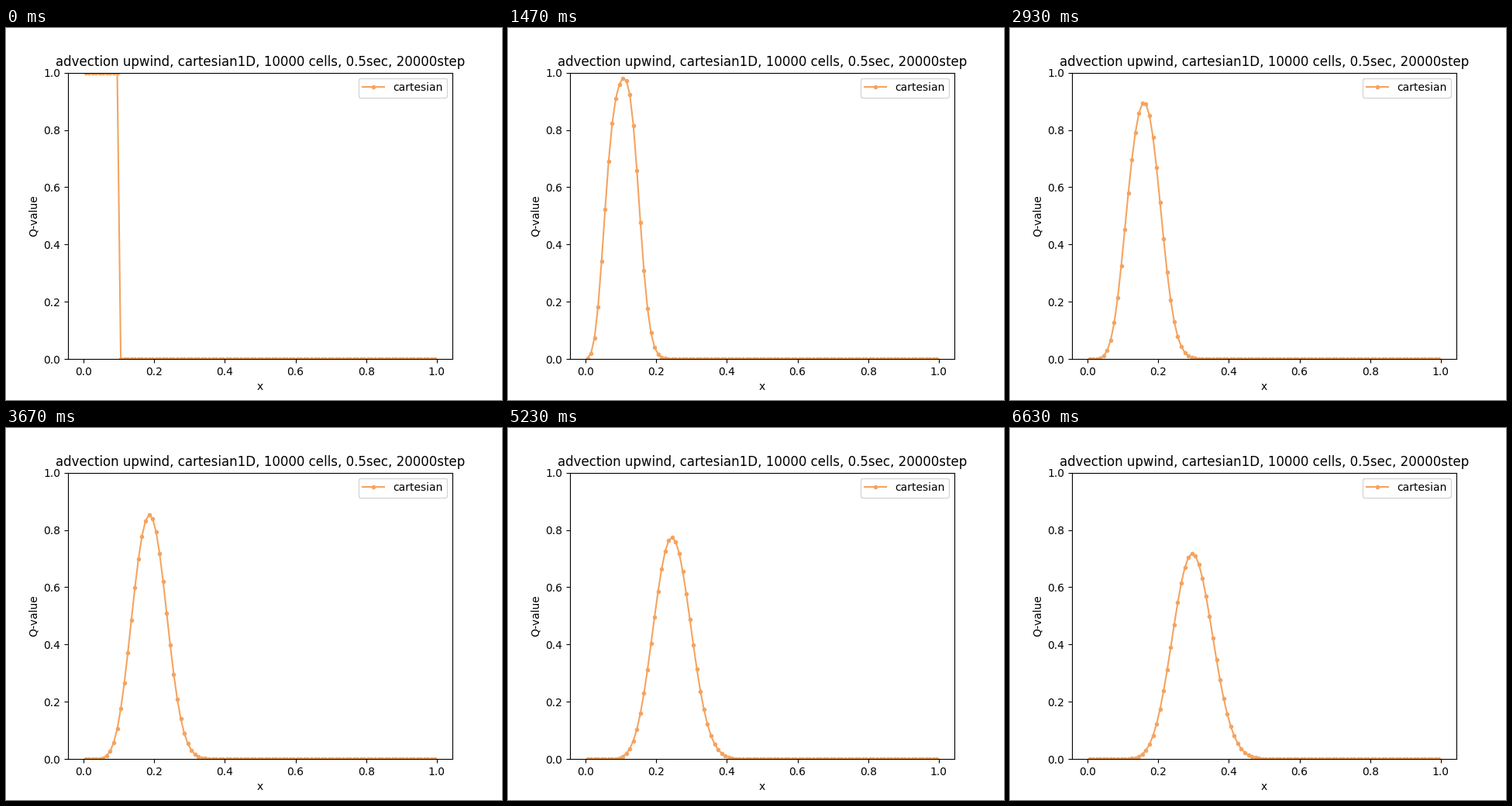
A matplotlib script that plays this animation: 640 by 480 pixels, repeating every 6.66 s.

```python
import matplotlib.pyplot as plt
import numpy as np
from matplotlib.animation import FuncAnimation

CELLS = 100
FRAMES = 200
LOOP_MS = 6660
COURANT = 0.125  # one upwind step per frame


def solve():
    """Advect a square pulse with the first-order upwind scheme, zero inflow."""
    q = np.zeros((FRAMES, CELLS))
    q[0, :10] = 1.0
    for n in range(1, FRAMES):
        upwind = np.concatenate(([0.0], q[n - 1, :-1]))
        q[n] = q[n - 1] - COURANT * (q[n - 1] - upwind)
    return q


x = (np.arange(CELLS) + 0.5) / CELLS
history = solve()

fig, ax = plt.subplots(figsize=(6.4, 4.8), dpi=100)
line, = ax.plot(x, history[0], color="sandybrown", marker=".", label="cartesian")
ax.set_ylim(0, 1)
ax.set_xlabel("x")
ax.set_ylabel("Q-value")
ax.set_title("advection upwind, cartesian1D, 10000 cells, 0.5sec, 20000step")
ax.legend(loc="upper right")


def update(n):
    line.set_ydata(history[n])
    return line,


anim = FuncAnimation(fig, update, frames=FRAMES, interval=LOOP_MS / FRAMES,
                     init_func=lambda: update(0), repeat=True, repeat_delay=0)
plt.show()
```
